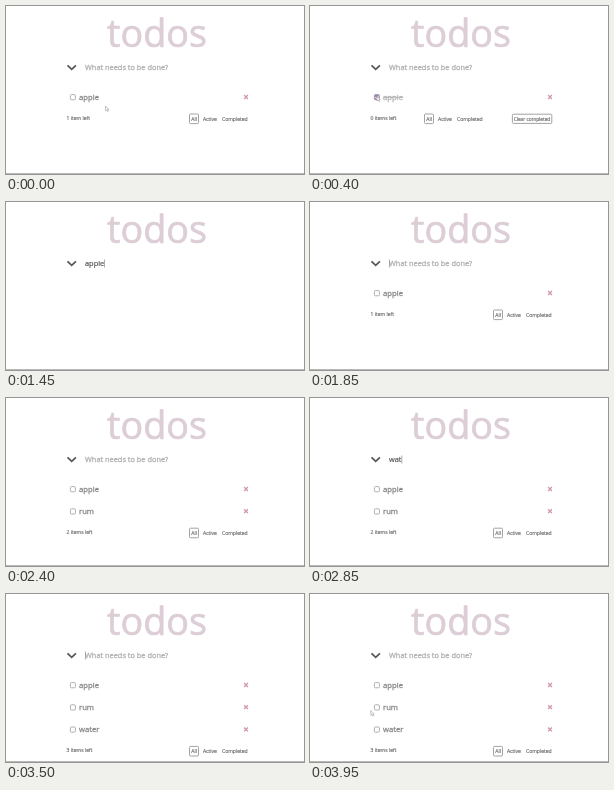
These frames come from a looping animation (298x168 px, 4000 ms). An HTML page:

```html
<!DOCTYPE html>
<html lang="en">
<head>
<meta charset="utf-8">
<title>todos</title>
<style>
  html, body { margin: 0; width: 100%; height: 100%; overflow: hidden; background: #fff; }
  svg { display: block; width: 100vw; height: 100vh; font-family: "Open Sans", "Noto Sans", sans-serif; }
  .title { font-size: 37.7px; fill: #dccdd6; stroke: #dccdd6; stroke-width: .7; }
  .field { font-size: 7.4px; fill: #555; stroke: #555; stroke-width: .2; }
  .field.empty { fill: #b4b4b4; stroke: #b4b4b4; stroke-width: .35; }
  .item text { font-size: 7.7px; fill: #888; stroke: #888; stroke-width: .3; }
  .box { fill: #fff; stroke: #a8a8a8; stroke-width: .9; }
  .kill { fill: none; stroke: #d39aa8; stroke-width: 1.4; }
  .done text { fill: #b4b4b4; stroke: #b4b4b4; text-decoration: line-through; }
  .done .box { fill: #9a86a8; stroke: #a898b0; }
  .tick { fill: none; stroke: #fff; stroke-width: 1; visibility: hidden; }
  .done .tick { visibility: visible; }
  .foot { font-size: 5px; fill: #777; stroke: #777; stroke-width: .2; }
  .frame { fill: none; stroke: #999; stroke-width: .9; }
</style>
</head>
<body>
<svg viewBox="0 0 298 168" preserveAspectRatio="none">
  <text class="title" x="101.1" y="40.6">todos</text>
  <path d="M61.5 59.3L65.7 63.3L69.9 59.3" fill="none" stroke="#555" stroke-width="1.7"/>
  <text class="field" id="field" x="79" y="64"></text>
  <rect id="caret" y="57.5" width=".8" height="8" fill="#999"/>
  <g id="list"></g>
  <g class="foot" id="foot">
    <text id="count" x="60.6" y=".8"></text>
    <g id="filters">
      <rect class="frame" x="183.5" y="-5" width="9" height="9.6" rx="1"/>
      <text x="188.1" y="2" text-anchor="middle">All</text>
      <text x="197" y="2">Active</text>
      <text x="216" y="2">Completed</text>
    </g>
    <g id="clear">
      <rect class="frame" x="202.4" y="-4.8" width="39.4" height="9.2" rx="1"/>
      <text x="222" y="2" text-anchor="middle" font-size="4.8">Clear completed</text>
    </g>
  </g>
  <rect y="167" width="298" height="1" fill="#b8b8b8"/>
  <path id="mouse" d="M0 0V4.8L1.1 3.9L1.9 5.6L2.7 5.2L2 3.6H3.4Z" fill="#fff" stroke="#999" stroke-width=".6"/>
</svg>
<script>
const LOOP = 4000, STEP = 50, ROW = 22.2;
const CHECK = 250, CLEAR = 1050;
const entries = [
  { word: "apple", type: 1150, enter: 1550 },
  { word: "rum", type: 2000, enter: 2200 },
  { word: "water", type: 2750, enter: 3250 }
];
// [start, end, from x, from y, to x, to y, hide at]
const moves = [
  [0, 200, 99.6, 100, 67, 90, 550],
  [550, 850, 69, 92, 224, 112, CLEAR],
  [3800, 3950, 53, 138, 60.8, 116.5, LOOP]
];
const $ = id => document.getElementById(id);
const show = (el, on) => el.setAttribute("visibility", on ? "visible" : "hidden");

$("list").innerHTML = entries.map((e, i) => `
  <g class="item" transform="translate(0 ${91 + i * ROW})">
    <rect class="box" x="64.4" y="-2.4" width="5" height="5.2" rx="1"/>
    <path class="tick" d="M65.4 .2L66.6 1.5L68.6 -1.3"/>
    <text x="73" y="3">${e.word}</text>
    <path class="kill" d="M238.1 -1.9L241.9 1.9M241.9 -1.9L238.1 1.9"/>
  </g>`).join("");
const rows = [...$("list").children];

function drawField(t) {
  const e = entries.find(e => t >= e.type && t < e.enter);
  const typed = e ? e.word.slice(0, 1 + Math.floor((t - e.type) / STEP)) : "";
  const field = $("field");
  field.textContent = typed || "What needs to be done?";
  field.classList.toggle("empty", !typed);
  const width = typed ? field.getComputedTextLength() : 0;
  $("caret").setAttribute("x", 79 + width);
  show($("caret"), typed || (t > CLEAR && t < 3750 && t % 500 < 375));
}

function drawList(t) {
  const count = t < CLEAR ? 1 : entries.filter(e => t >= e.enter).length;
  const done = t >= CHECK && t < CLEAR;
  rows.forEach((row, i) => { row.style.display = i < count ? "" : "none"; });
  rows[0].classList.toggle("done", done);
  const left = done ? 0 : count;
  $("count").textContent = `${left} item${left === 1 ? "" : "s"} left`;
  $("foot").style.display = count ? "" : "none";
  $("foot").setAttribute("transform", `translate(0 ${90.8 + count * ROW})`);
  $("filters").setAttribute("transform", `translate(${done ? -69 : 0} 0)`);
  $("clear").style.display = done ? "" : "none";
}

function drawMouse(t) {
  const move = moves.find(m => t >= m[0] && t < m[6]);
  show($("mouse"), move);
  if (!move) return;
  const [start, end, x0, y0, x1, y1] = move;
  const k = Math.min(1, (t - start) / (end - start));
  $("mouse").setAttribute("transform", `translate(${x0 + (x1 - x0) * k} ${y0 + (y1 - y0) * k})`);
}

const begin = performance.now();
function draw() {
  const t = Math.floor(((performance.now() - begin) % LOOP) / STEP) * STEP;
  drawField(t);
  drawList(t);
  drawMouse(t);
  requestAnimationFrame(draw);
}
draw();
</script>
</body>
</html>
```
